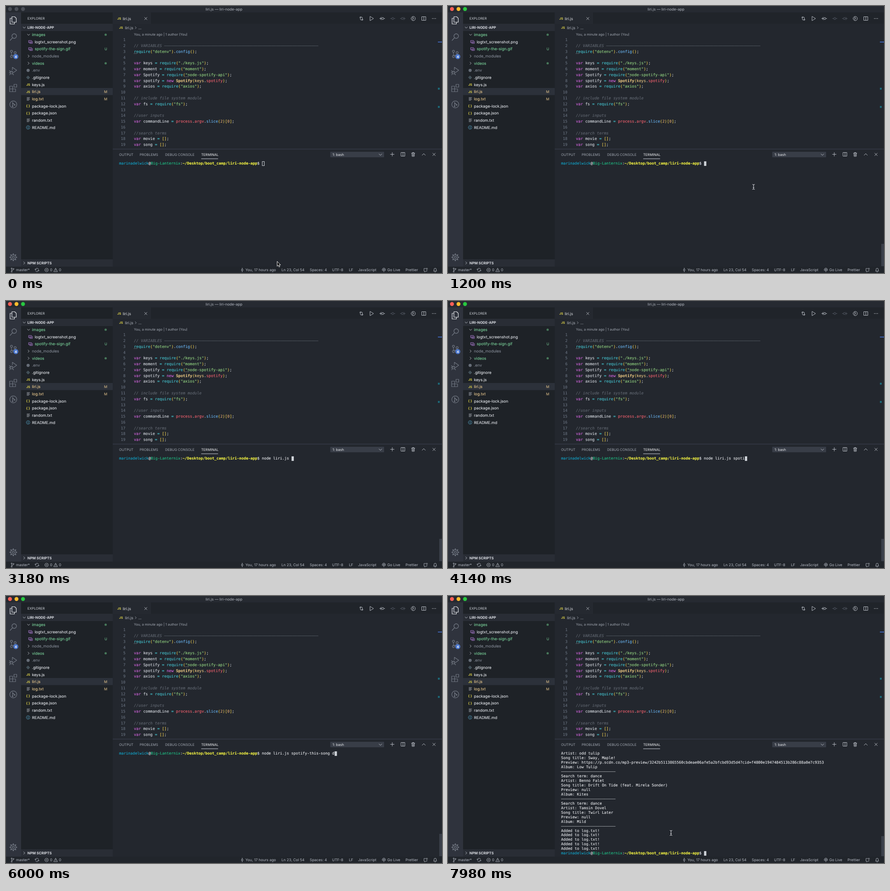
An HTML page for the animation above (8 s loop, 956 by 586 pixels).

```html
<!DOCTYPE html>
<html lang="en">
<head>
<meta charset="utf-8">
<title>Code editor with terminal</title>
<style>
  html, body { margin: 0; width: 100%; height: 100%; overflow: hidden; background: #23272e; }
  svg { display: block; }
  text { white-space: pre; text-rendering: geometricPrecision; font-family: Inter, "Open Sans", sans-serif; }
  .mono { font-family: "DejaVu Sans Mono", "Liberation Mono", monospace; }
  .icon { fill: none; stroke-linecap: round; stroke-linejoin: round; }
</style>
</head>
<body>
<svg id="stage" width="956" height="586" viewBox="0 0 956 586">
  <g id="panes"></g>
  <g id="lights"></g>
  <g id="icons"></g>
  <g id="labels"></g>
  <g id="code"></g>
  <g id="session"></g>
  <g id="results"></g>
  <rect id="caret" width="5" height="10"/>
  <rect id="scrollbar" x="950" width="6" fill="#3a3f49"/>
  <path id="arrow" d="M0 0V10.6L2.5 8.4L4.2 12.3L6 11.5L4.3 7.7H7.6Z" fill="#111" stroke="#fff" stroke-width=".9"/>
  <path id="beam" class="icon" d="M-2.2 -5.5Q0 -5.5 0 -4Q0 -5.5 2.2 -5.5M0 -4V4M-2.2 5.5Q0 5.5 0 4Q0 5.5 2.2 5.5M-1 1.5H1" stroke="#e4e6ea" stroke-width="1"/>
</svg>
<script>
const $ = id => document.getElementById(id);
const LOOP = 8000;
const CELL = 4.975, ROW = 9.955, TERM_X = 248, TERM_Y = 345.5, TERM_SIZE = 8.264;

const ink = {
  w: '#d6dae1', p: '#d566e0', c: '#45c4cf', g: '#93d582', b: '#6cb8f5',
  y: '#ecc883', r: '#f4626f', o: '#dca56e', k: '#f0cf52', d: '#626872',
  t: '#eceef1', u: '#11a8cd', h: '#1fc287', l: '#f5f543'
};

function add(parent, tag, attrs, content) {
  const node = document.createElementNS('http://www.w3.org/2000/svg', tag);
  for (const key in attrs) node.setAttribute(key, attrs[key]);
  if (content !== undefined) node.textContent = content;
  return parent.appendChild(node);
}

const rect = (x, y, width, height, fill, rx = 0) =>
  add($('panes'), 'rect', { x, y, width, height, fill, rx });

// y is the middle of the capital letters
const label = (x, y, content, size = 8, fill = '#bcc1ca', extra = {}) =>
  add($('labels'), 'text', { x, y: y + size * 0.36, 'font-size': size, fill, ...extra }, content);

const icon = (d, stroke = '#c5c9d1', width = 0.9, fill = 'none') =>
  add($('icons'), 'path', { d, class: 'icon', stroke, 'stroke-width': width, style: `fill:${fill}` });

const ring = (x, y, r) => `M${x - r} ${y}a${r} ${r} 0 1 0 ${2 * r} 0a${r} ${r} 0 1 0 ${-2 * r} 0`;
const box = (x, y, w, h) => `M${x} ${y}h${w}v${h}h${-w}z`;
const chevronDown = (x, y, s) => `M${x - s} ${y - s / 2}l${s} ${s}l${s} ${-s}`;
const chevronRight = (x, y, s) => `M${x - s / 2} ${y - s}l${s} ${s}l${-s} ${s}`;
const cross = (x, y, s) => `M${x - s} ${y - s}l${2 * s} ${2 * s}m0 ${-2 * s}l${-2 * s} ${2 * s}`;
const bold = { 'font-weight': 700 };

// A hairline stroke gives the slightly heavier look of smoothed text
const smooth = color => ({ fill: color, stroke: color, 'stroke-width': 0.12 });

// "^x" switches to ink x; an upper-case letter also makes it bold
function richLine(parent, x, y, size, source) {
  const line = add(parent, 'text', { x, y: y + size * 0.34, 'font-size': size, class: 'mono' });
  const parts = source.split(/\^(\w)/);
  for (let i = 1; i < parts.length; i += 2) {
    const key = parts[i], attrs = smooth(ink[key.toLowerCase()]);
    if (key !== key.toLowerCase()) attrs['font-weight'] = 700;
    if (key === 'd') attrs['font-style'] = 'italic';
    add(line, 'tspan', attrs, parts[i + 1]);
  }
  return line;
}

function drawPanes() {
  rect(0, 0, 956, 586, '#23272e');
  rect(0, 0, 956, 14, '#262a31');
  rect(0, 14, 33, 558, '#2f333d');
  rect(33, 14, 201, 558, '#1e2227');
  rect(33, 39, 201, 16, '#292d35');
  rect(33, 180, 201, 15.5, '#2c313a');
  rect(33, 556, 201, 16, '#292d35');
  rect(234, 14, 722, 25, '#20242a');
  rect(234, 14, 84, 25, '#252930');
  rect(0, 572, 956, 14, '#21252b');
  rect(234, 313.5, 722, 1, '#3e4452');
  rect(428, 334.8, 37, 1, '#c8ccd4');
  rect(711, 320, 118, 12, '#383d47', 1);
  rect(947, 78.3, 9, 1.6, '#446fd2');
  rect(947, 179.5, 4, 4, '#1c6c7c');
  rect(947, 219.5, 4, 4, '#1c6c7c');
}

function drawTree() {
  const green = '#78cf98', amber = '#eac98f', plain = '#e2e5ea', dim = '#828893';
  const files = [
    ['images', green, 'open'], ['logtxt_screenshot.png', plain, 'image'],
    ['spotify-the-sign.gif', green, 'image'], ['node_modules', dim, 'closed'],
    ['videos', green, 'closed'], ['.env', dim, 'gear'], ['.gitignore', plain, 'diamond'],
    ['keys.js', plain, 'js'], ['liri.js', amber, 'js'], ['log.txt', amber, 'lines'],
    ['package-lock.json', plain, 'json'], ['package.json', plain, 'json'],
    ['random.txt', plain, 'lines'], ['README.md', plain, 'info']
  ];
  const marks = {
    open: y => icon(chevronDown(49.5, y, 2.6)),
    closed: y => icon(chevronRight(49.5, y, 2.6)),
    image: y => icon(box(50, y - 3, 6, 4.5) + `M52 ${y + 3.3}h6v-4.5M51 ${y + 1}l2 -2l2 2`, '#a074c4', 1),
    gear: y => icon(ring(48.5, y, 2.6) + ring(48.5, y, 1), '#737a85', 1.4),
    diamond: y => icon(`M48.5 ${y - 3.5}l3.5 3.5l-3.5 3.5l-3.5 -3.5zM47.5 ${y - 1}l2 2`, '#596a73', 0.9, '#3b4850'),
    js: y => label(44.5, y, 'JS', 6.8, '#ddd148', bold),
    lines: y => icon(`M46 ${y - 3}h6M46 ${y - 1}h5M46 ${y + 1}h6M46 ${y + 3}h4`, '#b9bec6', 0.8),
    json: y => label(44, y - 0.4, '{ }', 7.5, '#ddd148', bold),
    info: y => { icon(ring(48.5, y, 3.8), '#519aba'); icon(`M48.5 ${y - 0.5}v2.3M48.5 ${y - 2}v.1`, '#519aba', 1.1); }
  };
  files.forEach(([name, color, mark], i) => {
    const y = 63.1 + i * 15.65;
    marks[mark](y);
    label(mark === 'image' ? 63 : 57, y, name, 8.6, color, smooth(color));
  });
  label(216, 94.4, 'U', 7.8, green);
  label(215, 188.3, 'M', 7.8, amber);
  label(215, 204, 'M', 7.8, amber);
  icon(ring(218.5, 63, 2.5) + ring(218.5, 125.7, 2.5), 'none', 0, '#47785a');
}

function drawLabels() {
  label(478, 6.7, 'liri.js — liri-node-app', 8.1, '#b4b9c2', { 'text-anchor': 'middle' });
  label(47, 27.5, 'EXPLORER', 7.45, '#cdd1d8');
  label(47, 47.3, 'LIRI-NODE-APP', 7.7, '#dadde3', bold);
  label(47, 564, 'NPM SCRIPTS', 7.75, '#dadde3', bold);
  label(244, 27.5, 'JS', 6.8, '#ddd148', bold);
  label(256, 27.5, 'liri.js', 8.4, '#e6e8ec');
  label(248, 47.5, 'JS', 6.8, '#ddd148', bold);
  label(261, 47.5, 'liri.js', 8.4);
  label(290, 47.5, '...', 8.4);
  label(280.5, 62.3, 'You, a minute ago | 1 author (You)', 7.4, '#a2a8b2');
  [[248, 'OUTPUT'], [293, 'PROBLEMS'], [349, 'DEBUG CONSOLE'], [428, 'TERMINAL']].forEach(([x, name]) =>
    label(x, 326.5, name, 7.5, name === 'TERMINAL' ? '#f2f3f5' : '#a2a8b2'));
  label(716, 326.5, '1: bash', 7.65, '#ebedf0');
  [[22, 'master*'], [96.5, '0'], [116, '0'], [525, 'You, 17 hours ago'], [604, 'Ln 23, Col 54'],
   [666, 'Spaces: 4'], [715, 'UTF-8'], [752, 'LF'], [772, 'JavaScript'], [836, 'Go Live'], [876, 'Prettier']]
    .forEach(([x, name]) => label(x, 579.3, name, 8, '#b6bbc5'));
}

function drawIcons() {
  const idle = '#717782';
  // activity bar
  icon('M13 23.5h6l3.5 3.5v8.5h-9.5zM13 27h-4v12.5h9.5v-4', '#e3e5e9', 1.2);
  icon(ring(18, 66, 5) + 'M14.3 69.7L9 75.5', idle, 1.3);
  icon(ring(12, 99.5, 2.3) + ring(12, 111, 2.3) + ring(20, 102.5, 2.3) + 'M12 102v6.7M20 105q0 3 -7.5 3.5', idle, 1.2);
  icon(ring(21.5, 111, 5.5), 'none', 0, '#4d78cc');
  label(19.3, 111, '4', 7, '#fff', bold);
  icon('M14 140v-5.5l9.5 6.5l-7 5' + ring(12, 146, 3) + 'M7.5 142l2 2M7 146.5h2M8 151l1.5 -2M16.5 151l-1.8 -2M9.5 145h5', idle, 1.2);
  icon(box(8, 176, 6.5, 6) + box(8, 182, 6.5, 6) + box(14.5, 182, 6.5, 6) + box(17.5, 172, 6, 6), idle, 1.2);
  icon(ring(16, 216, 7.7) + 'M14.5 211v10M15 213l4 4' + ring(14.5, 220, 1) + ring(19, 217, 1), idle, 1.2);
  icon(ring(16, 551.5, 2.4) + ring(16, 551.5, 5.6), idle, 1.2);
  for (let i = 0; i < 8; i++) {
    const a = i * Math.PI / 4, x = Math.cos(a), y = Math.sin(a);
    icon(`M${16 + 6 * x} ${551.5 + 6 * y}L${16 + 7.5 * x} ${551.5 + 7.5 * y}`, idle, 2.2);
  }
  // sidebar sections, tab and breadcrumb
  icon(chevronDown(40, 47.3, 2.6) + chevronRight(40, 564, 2.6));
  icon(cross(306.5, 27.5, 2.6));
  icon(chevronRight(284.5, 47.7, 2.3), '#a2a8b2');
  // editor actions
  icon('M777 24v5q0 2 3 2M781.5 31v-5q0 -2 -3 -2M775.5 25.5l1.5 -1.8l1.5 1.8M780 29.5l1.5 1.8l1.5 -1.8');
  icon('M798.5 23l7.5 4.5l-7.5 4.5z');
  icon(ring(826, 27.5, 2.3) + 'M828.5 27.5h2M823 24.5l-3 3l3 3M820 27.5h3.5');
  icon(ring(848, 27.5, 2.3) + 'M843 27.5h2.5M850.5 27.5h2.5', '#555b66');
  icon(ring(869, 27.5, 2.3) + 'M864.5 27.5h2M872 24.5l3 3l-3 3M875 27.5h-3.5', '#555b66');
  icon(ring(893, 27.5, 4.6) + 'M892 24.5v6M892.5 25.5l2.5 2.5');
  icon(box(912, 23.5, 8.5, 8) + 'M916.2 23.5v8');
  icon('M935 27.5h.1M938.4 27.5h.1M941.8 27.5h.1', '#c5c9d1', 1.6);
  // panel actions
  icon(chevronDown(821, 326.3, 3));
  icon('M847 321.5v8M843 325.5h8');
  icon(box(866.5, 321.5, 8, 8) + 'M870.5 321.5v8');
  icon('M889 323h7.5M891.5 323v-1.5h2.5v1.5M890 323l.4 7h4.8l.4 -7M892 325v3.5M893.7 325v3.5');
  icon('M912.5 327.5l3.5 -3.5l3.5 3.5');
  icon(cross(938.5, 325.7, 2.8));
  // status bar
  const bar = '#b6bbc5';
  icon(ring(12.5, 576, 1.2) + ring(12.5, 583, 1.2) + ring(16.5, 577, 1.2) + 'M12.5 577.2v4.6M16.5 578.2q0 2 -4 2.5', bar, 0.8);
  icon('M64.5 578.5a3.6 3.6 0 0 1 6.8 -1M71.5 580a3.6 3.6 0 0 1 -6.8 1M63.3 577.5l1.2 1.6l1.8 -1M72.7 581l-1.2 -1.6l-1.8 1', bar, 0.9);
  icon(ring(89, 579.3, 3.8) + cross(89, 579.3, 1.5), bar, 0.8);
  icon('M109 575.5l4 7.5h-8zM109 578v2.2M109 581.6v.1', bar, 0.8);
  icon(ring(518, 579.3, 1.8) + 'M518 575v2.5M518 581.2v2.5', bar, 0.9);
  icon('M826 581.5a3.6 3.6 0 1 1 5 0M828.5 579v4.5M827.3 580a1.6 1.6 0 1 1 2.4 0', bar, 0.9);
  icon('M920 576h-3.5v6h1.5v2l2 -2h3v-2' + ring(922.7, 576.8, 1.5), bar, 0.8);
  icon('M937.5 581.8h7l-1 -1.7v-2a2.5 2.5 0 0 0 -5 0v2zM940 583.5h2', bar, 0.9);
  // hint dots under the code
  const hint = icon('M281 104.3h7M394 155.3h7', '#b2b7c0', 1.1);
  hint.setAttribute('stroke-dasharray', '.2 2.5');
}

function drawCode() {
  const load = (name, pkg) => `^pvar^w ${name} ^c= require^k(^g"${pkg}"^k)^w;`;
  const lines = [
    '', '^d// VARIABLES ' + '—'.repeat(66), '^crequire^k(^g"dotenv"^k)^w.^bconfig^k()^w;', '',
    load('keys', './keys.js'), load('moment', 'moment'), load('Spotify', 'node-spotify-api'),
    '^pvar^w spotify ^c= ^pnew ^YSpotify^k(^ykeys^w.^rspotify^k)^w;', load('axios', 'axios'), '',
    '^d// include file system module', load('fs', 'fs'), '',
    '^d//user inputs', '^pvar^w commandLine ^c= ^rprocess^w.^rargv^w.^bslice^k(^o2^k)[^o0^k]^w;', '',
    '^d//search terms', '^pvar^w movie ^c= ^k[]^w;', '^pvar^w song ^c= ^k[]^w;'
  ];
  lines.forEach((source, i) => {
    const y = 74.3 + i * 12.78;
    add($('code'), 'text', { x: 262, y: y + 2.9, 'font-size': 8.5, fill: '#6f7988', 'text-anchor': 'end', class: 'mono' }, i + 1);
    richLine($('code'), 280.5, y, 8.5, source);
  });
}

const PROMPT = '^umarinadelwick^t@^hBig-Lanternix^t:^L~/Desktop/boot_camp/liri-node-app^t$ ';
const PROMPT_CELLS = 63;
const COMMAND = 'node liri.js spotify-this-song dance';
const termLine = (parent, row, source) => richLine(parent, TERM_X, TERM_Y + row * ROW, TERM_SIZE, source);

function drawResults() {
  const rule = '—'.repeat(24);
  const entry = (artist, song, preview, album) =>
    [`Artist: ${artist}`, `Song title: ${song}`, `Preview: ${preview}`, `Album: ${album}`, rule];
  const url = 'https://p.scdn.co/mp3-preview/3242b5113865560cbdeae06afe5a2bfcbd93d5d4?cid=f4800e1947484513b286c88a0e7c9353';
  const rows = [
    ...entry('odd tulip', 'Sway, Maple!', url, 'Low Tulip'), 'Search term: dance',
    ...entry('Benno Falet', 'Drift On Tide (feat. Mirela Sonder)', 'null', 'Kites'), 'Search term: dance',
    ...entry('Tamsin Dovel', 'Twirl Later', 'null', 'Mild'),
    ...Array(5).fill('Added to log.txt!')
  ];
  rows.forEach((row, i) => termLine($('results'), i, '^t' + row));
  termLine($('results'), rows.length, PROMPT);
}

drawPanes();
drawTree();
drawLabels();
drawIcons();
drawCode();
drawResults();
const lights = [8.7, 23, 37.3].map(cx => add($('lights'), 'circle', { cx, cy: 6.6, r: 4.3 }));
const typed = add(termLine($('session'), 0, PROMPT), 'tspan', smooth(ink.t));
const loaded = termLine($('session'), 1, '^tthis is loaded');

const FOCUS = 640, ENTER = 6560, LOADED = 6800, DONE = 7480;
const TYPING = [[1380, 0], [2270, 9], [4130, 18], [4950, 23], [6420, 36]];

function typedCount(t) {
  if (t < TYPING[0][0]) return 0;
  for (let i = 1; i < TYPING.length; i++) {
    const [t0, n0] = TYPING[i - 1], [t1, n1] = TYPING[i];
    if (t < t1) return Math.floor(n0 + (n1 - n0) * (t - t0) / (t1 - t0));
  }
  return COMMAND.length;
}

function glide(t, start, end, from, to) {
  const k = Math.min(1, Math.max(0, (t - start) / (end - start)));
  const e = k * k * (3 - 2 * k);
  return from.map((v, i) => v + (to[i] - v) * e);
}

const show = (node, on) => node.setAttribute('display', on ? 'inline' : 'none');

function render(t) {
  const focused = t >= FOCUS, done = t >= DONE, count = typedCount(t);
  lights.forEach((light, i) => light.setAttribute('fill', focused ? ['#ff5f57', '#febc2e', '#28c840'][i] : '#4b4f57'));

  typed.textContent = COMMAND.slice(0, count);
  show(loaded, t >= LOADED);
  show($('session'), !done);
  show($('results'), done);

  let row = 0, col = PROMPT_CELLS + count;
  if (done) [row, col] = [22, PROMPT_CELLS];
  else if (t >= ENTER) [row, col] = [t >= LOADED ? 2 : 1, 0];
  const caret = $('caret'), inset = focused ? 0 : 0.5;
  caret.setAttribute('x', TERM_X + col * CELL + inset);
  caret.setAttribute('y', TERM_Y + row * ROW - 4.6 + inset);
  caret.setAttribute('width', 5 - inset);
  caret.setAttribute('height', 10 - 2 * inset);
  caret.setAttribute('fill', focused ? '#d0d4da' : 'none');
  caret.setAttribute('stroke', focused ? 'none' : '#d0d4da');

  show($('scrollbar'), focused);
  $('scrollbar').setAttribute('y', done ? 527 : 522);
  $('scrollbar').setAttribute('height', done ? 44 : 49);

  const [x, y] = t < 4000
    ? glide(t, 60, 720, [594.5, 560.5], [670, 397])
    : glide(t, 7420, 7900, [670, 397], [489, 520]);
  const place = `translate(${x} ${y})`;
  $('arrow').setAttribute('transform', place);
  $('beam').setAttribute('transform', place);
  show($('arrow'), !focused);
  show($('beam'), focused && (t < TYPING[0][0] || t >= 7420));
}

const start = performance.now();
function tick() {
  render((performance.now() - start) % LOOP);
  requestAnimationFrame(tick);
}
tick();
</script>
</body>
</html>
```
